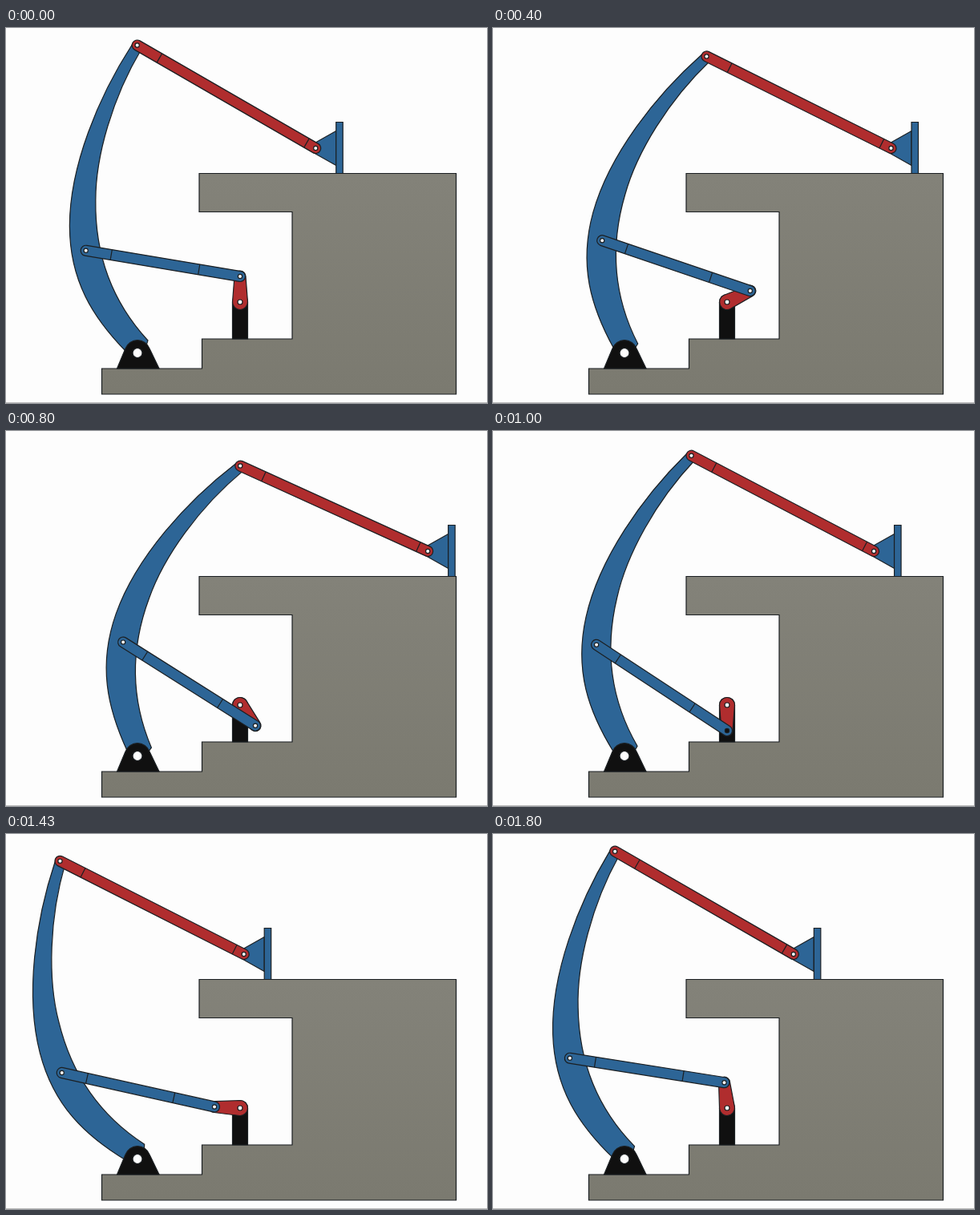
An HTML page with a canvas that plays this animation: 600x468 px, repeating every 1830 ms.

```html
<!DOCTYPE html>
<html>
<head>
<meta charset="utf-8">
<style>
html, body { margin: 0; width: 600px; height: 468px; overflow: hidden; background: #fdfdfd }
canvas { display: block }
</style>
</head>
<body>
<canvas id="stage" width="600" height="468"></canvas>
<script>
const ctx = document.getElementById('stage').getContext('2d');
const BLUE = '#2d6596', RED = '#b02d2e', BLACK = '#101010', WHITE = '#fdfdfd', EDGE = '#1b1f22';
const LOOP = 1830, RAD = Math.PI / 180;
const base = { x: 164, y: 405.5 }, hub = { x: 292, y: 342 };
const CRANK = 32, COUPLER = 195, ARM_PIN = 143, ARM_TIP = 384, PIN_OFFSET = -26.68 * RAD;
const LINK = 257, SLIDE_Y = 150;

// crank turn in degrees at given steps of 1/30 s
const turns = [[0, 0], [12, 64.2], [16, 92.3], [18, 107], [30, 180], [32, 194],
  [38, 234.8], [48, 310.5], [54, 353.7], [55, 360]];

const armPath = new Path2D(`M150 404 C108 361 79.5 315 79.5 247 C79.5 172 116 85 157.5 21
  A6.5 6.5 0 0 1 169.5 26 C133 87 112 160 112 215 C111 280 131 340 177 390 L170 412 Z`);
const bodyPath = new Path2D(`M119.5 425H244.5V388H357V229.5H241V181.5H561.5V457H119.5Z`);
const shade = ctx.createLinearGradient(0, 181, 0, 457);
shade.addColorStop(0, '#838279');
shade.addColorStop(1, '#7b7a70');

function crankAngle(step) {
  const i = turns.findIndex(k => k[0] > step);
  const [s0, a0] = turns[i - 1], [s1, a1] = turns[i];
  return (a0 + (a1 - a0) * (step - s0) / (s1 - s0)) * RAD;
}

// angles run clockwise from straight up
const polar = (o, r, a) => ({ x: o.x + r * Math.sin(a), y: o.y - r * Math.cos(a) });

function paint(path, fill) {
  ctx.fillStyle = fill;
  ctx.fill(path);
  ctx.stroke(path);
}

function hole(p, r = 2.6, fill = WHITE) {
  const c = new Path2D();
  c.arc(p.x, p.y, r, 0, 7);
  paint(c, fill);
}

// rounded bar from a to b with end radii ra, rb and cross marks at the given distances from a
function bar(a, b, ra, rb, fill, marks = []) {
  const len = Math.hypot(b.x - a.x, b.y - a.y), q = Math.PI / 2;
  const p = new Path2D();
  p.arc(0, 0, ra, q, -q);
  p.arc(len, 0, rb, -q, q);
  p.closePath();
  ctx.save();
  ctx.translate(a.x, a.y);
  ctx.rotate(Math.atan2(b.y - a.y, b.x - a.x));
  paint(p, fill);
  ctx.beginPath();
  for (const m of marks) {
    ctx.moveTo(m, -ra);
    ctx.lineTo(m, ra);
  }
  ctx.stroke();
  ctx.restore();
}

function armAngle(pin) {
  const dx = pin.x - base.x, dy = pin.y - base.y, d = Math.hypot(dx, dy);
  const toPin = Math.atan2(dx, -dy);
  const inner = Math.acos((ARM_PIN ** 2 + d * d - COUPLER ** 2) / (2 * ARM_PIN * d));
  return toPin - inner - PIN_OFFSET;
}

function draw(step) {
  const crankPin = polar(hub, CRANK, crankAngle(step));
  const swing = armAngle(crankPin);
  const armPin = polar(base, ARM_PIN, swing + PIN_OFFSET);
  const tip = polar(base, ARM_TIP, swing);
  const slide = { x: tip.x + Math.sqrt(LINK ** 2 - (SLIDE_Y - tip.y) ** 2), y: SLIDE_Y };

  ctx.fillStyle = WHITE;
  ctx.fillRect(0, 0, 600, 468);
  ctx.fillStyle = '#bdbdbd';
  ctx.fillRect(0, 467, 600, 1);
  ctx.strokeStyle = EDGE;
  ctx.lineWidth = 1.2;
  paint(bodyPath, shade);

  // swinging arm and its bearing
  ctx.save();
  ctx.translate(base.x, base.y);
  ctx.rotate(swing);
  ctx.translate(-base.x, -base.y);
  paint(armPath, BLUE);
  ctx.restore();
  paint(new Path2D('M138.5 425L149 400A16 16 0 0 1 179 400L191 425Z'), BLACK);
  hole(base, 6, WHITE);

  // post, crank and coupler
  paint(new Path2D('M282.5 388V342A9.5 9.5 0 0 1 301.5 342V388Z'), BLACK);
  bar(hub, crankPin, 9.5, 7, RED);
  hole(hub, 3);
  bar(armPin, crankPin, 6.5, 6.5, BLUE, [32, COUPLER - 52]);
  hole(armPin);
  const overPost = crankPin.y > hub.y && Math.abs(crankPin.x - hub.x) < 10;
  hole(crankPin, 2.6, overPost ? BLACK : WHITE);

  // slider and its link
  ctx.save();
  ctx.translate(slide.x, slide.y);
  paint(new Path2D('M25.5 -21.5L-3 -5.5V5.5L25.5 21.5Z'), BLUE);
  paint(new Path2D('M25.5 -32.5H34V31.5H25.5Z'), BLUE);
  ctx.restore();
  bar(tip, slide, 6.5, 6.5, RED, [32, LINK - 13]);
  hole(tip);
  hole(slide);
}

function tick(now) {
  // the picture advances 30 times a second, on whole 10 ms marks
  const ticks = Math.floor(now % LOOP / 10);
  draw(Math.floor((ticks + 1) * 0.3 - 0.05));
  requestAnimationFrame(tick);
}
draw(0);
requestAnimationFrame(tick);
</script>
</body>
</html>
```
